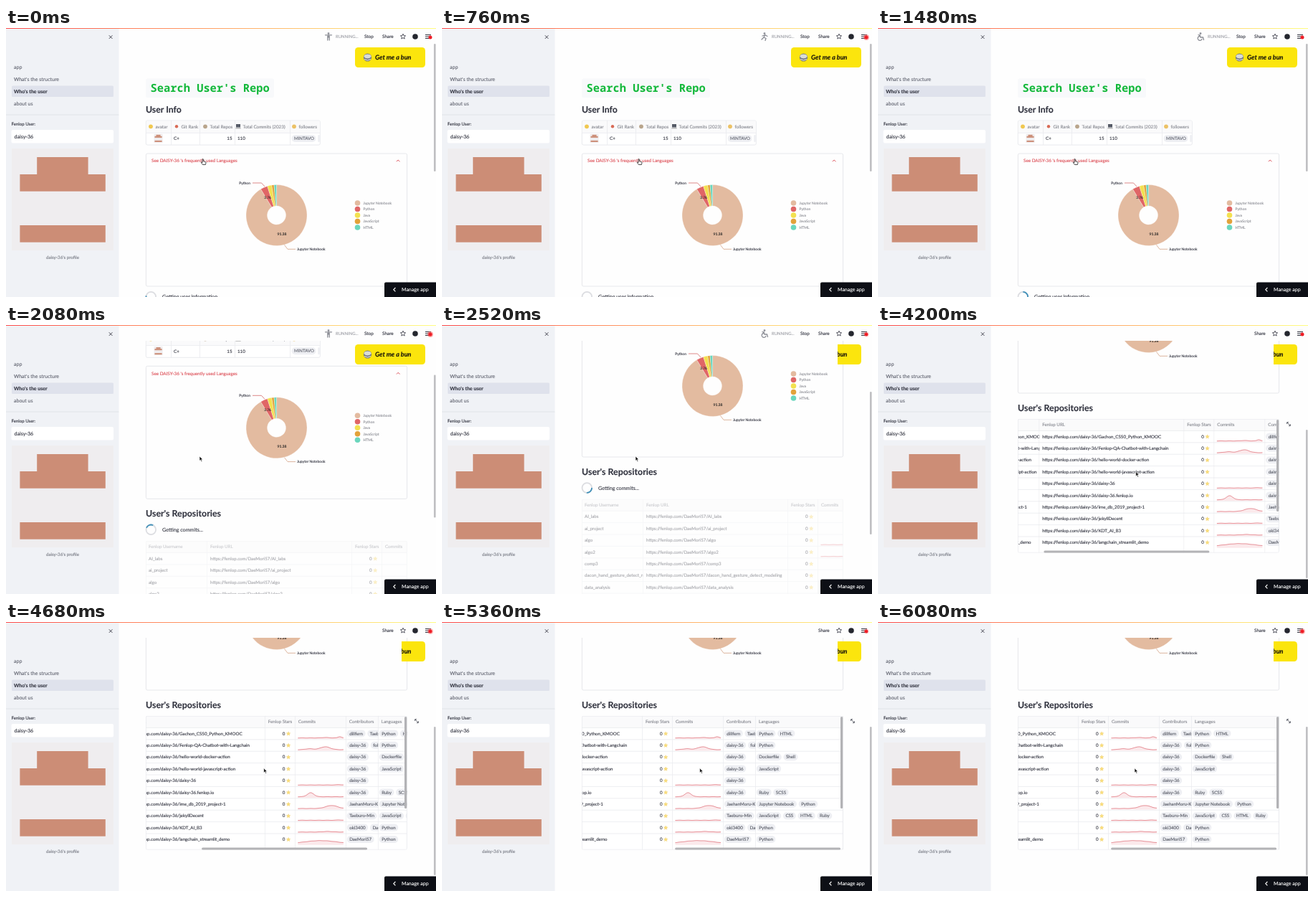
An HTML page that plays this animation: 600x375 px, repeating every 6.12 s.

```html
<!DOCTYPE html>
<html lang="en">
<head>
<meta charset="utf-8">
<title>Repository dashboard</title>
<style>
  html, body { margin: 0; width: 100%; height: 100%; overflow: hidden; background: #fefefe; }
  svg { display: block; }
  #stage { width: 100vw; height: 100vh; }
  text { font-family: Lato, "Open Sans", sans-serif; white-space: pre; text-rendering: geometricPrecision; }
</style>
</head>
<body>
<svg id="stage" viewBox="0 0 600 375" xmlns="http://www.w3.org/2000/svg"></svg>
<script>
const LOOP = 6120;
const USER = "daisy-36", OLD_USER = "DaeMori57", HOST = "Fenlop";
const INK = "#31333f", GREY = "#85878f", LINE = "#e9eaee", RED = "#dc4c55", CLAY = "#cc8d76", PAPER = "#fefefe";
const ROW = 16.4;
const stage = document.getElementById("stage");

// Markup helpers; text is placed by its visual middle and slightly thickened.
const text = (x, y, str, size = 6.2, fill = INK, extra = "") =>
  `<text x="${x}" y="${y + size * 0.36}" font-size="${size}" fill="${fill}" stroke="${fill}" stroke-width="0.12" ${extra}>${str}</text>`;
const rect = (x, y, w, h, fill, extra = "") =>
  `<rect x="${x}" y="${y}" width="${w}" height="${h}" fill="${fill}" ${extra}/>`;
const path = (d, stroke = INK, width = 1, fill = "none", extra = "") =>
  `<path d="${d}" stroke="${stroke}" stroke-width="${width}" fill="${fill}" ${extra}/>`;
const dot = (x, y, r, fill, extra = "") => `<circle cx="${x}" cy="${y}" r="${r}" fill="${fill}" ${extra}/>`;
const group = (id, body, extra = "") => `<g id="${id}" ${extra}>${body}</g>`;
const pane = (x, y, w, h, body) =>
  `<svg x="${x}" y="${y}" width="${w}" height="${h}" overflow="hidden">${body}</svg>`;
const BOLD = 'font-weight="700"', END = 'text-anchor="end"', MID = 'text-anchor="middle"';

function starPath(cx, cy, r) {
  const points = Array.from({ length: 10 }, (_, i) => {
    const a = i * Math.PI / 5, k = i % 2 ? r * 0.45 : r;
    return `${(cx + k * Math.sin(a)).toFixed(2)} ${(cy - k * Math.cos(a)).toFixed(2)}`;
  });
  return `M${points.join("L")}Z`;
}

function avatar(x, y, k) {
  return `<g transform="translate(${x} ${y}) scale(${k})">` + rect(0, 0, 142, 142, "#efedef") +
    rect(35.2, 12, 71.4, 24.5, CLAY) + rect(11.4, 36, 119.4, 23.7, CLAY) + rect(11.4, 107, 119.4, 23.7, CLAY) + "</g>";
}

function sidebar() {
  const nav = "#60636f";
  return rect(0, 0, 157.5, 375, "#f0f2f6") +
    path("M143.8 10.3l4.6 4.6M148.4 10.3l-4.6 4.6", INK, 0.9) +
    rect(8, 80.5, 142, 15.5, "#dfe2ec", 'rx="1.5"') +
    text(11, 54.5, "app", 7, nav) + text(11, 71.5, "What's the structure", 7, nav) +
    text(11, 88.3, "Who's the user", 7, INK, BOLD) + text(11, 105, "about us", 7, nav) +
    path("M0 121H157.5", "#dcdee4", 0.8) +
    text(7.5, 134, `${HOST} User:`, 6.1) +
    rect(7.5, 142, 142.5, 18.5, "#fff", 'rx="2"') + text(11.5, 151, USER, 7.1) +
    avatar(8, 168, 1) + text(79, 320, `${USER}'s profile`, 6.2, "#777a84", MID);
}

function infoTable() {
  const heads = [[202, "avatar", "#f0c850"], [238, "Git Rank", "#d86a55"], [278, "Total Repos", "#b9a58c"],
    [324, "Total Commits (2023)", "#555a66"], [402, "followers", "#ecc266"]];
  return rect(195.3, 129, 243, 34, "#fff", `stroke="${LINE}" rx="2"`) + rect(195.8, 129.5, 242, 16.5, "#fafafb") +
    path("M195 146.3H438M230.5 129V163M270.5 129V163M319.5 129V163M396.5 129V163", LINE, 0.8) +
    heads.map(([x, label, tint], i) => (i === 3
      ? rect(x - 3, 134, 6, 4.5, tint) + path("M320.4 139.8h7.2", "#999", 1)
      : dot(x, 137.3, i === 1 ? 2.2 : 2.9, tint)) + text(x + 6.5, 137.3, label, 6.3, GREY)).join("") +
    avatar(206.5, 147.8, 0.085) + text(234, 154, "C+") + text(315.5, 154, "15", 6.2, INK, END) + text(323, 154, "110") +
    rect(398.5, 149, 34, 10, "#eeeff3", 'rx="5"') + text(402, 154, "MINTAVO", 6.1, "#656873") +
    rect(435.2, 149, 2.6, 10, "#eeeff3", 'rx="1.3"');
}

function pie() {
  const cx = 377.5, cy = 261, R = 42.5, r = 13;
  const slices = [["Jupyter Notebook", 91.38, "#e3bba0"], ["Python", 3.76, "#e06666"], ["Java", 2.3, "#f3e150"],
    ["JavaScript", 1.28, "#e3a23a"], ["HTML", 1.28, "#6bd6bd"]];
  const at = (share, k) => {
    const a = share / 100 * 2 * Math.PI;
    return `${(cx + k * Math.sin(a)).toFixed(2)} ${(cy - k * Math.cos(a)).toFixed(2)}`;
  };
  let from = 0, out = "";
  slices.forEach(([name, share, fill], i) => {
    const to = from + share, big = share > 50 ? 1 : 0;
    out += path(`M${at(from, R)}A${R} ${R} 0 ${big} 1 ${at(to, R)}L${at(to, r)}A${r} ${r} 0 ${big} 0 ${at(from, r)}Z`,
      "#fff", 0.3, fill);
    out += dot(490.5, 244 + i * 8.5, 3.8, fill) + text(498.5, 244 + i * 8.5, name, 5, "#8d8f96");
    from = to;
  });
  return out + path("M361 221L356.5 216H344", "#d56a6a", 0.8) + path("M388.5 302.5L393 308.3H404", "#d3a386", 0.8) +
    text(341, 216, "Python", 5, INK, END) + text(406, 308.3, "Jupyter Notebook", 5) +
    text(385, 287, "91.38", 5, "#222", MID) + text(365, 236, "3.76", 4.8, "#222", MID);
}

function spinner(id, y, label) {
  return dot(202.3, y, 6.8, "none", 'stroke="#dcdde1" stroke-width="1.8"') +
    `<circle id="${id}" cx="202.3" cy="${y}" r="6.8" fill="none" stroke="#3f8fb8" stroke-width="1.8" stroke-dasharray="11 32"/>` +
    text(218, y, label, 7.2);
}

// Each bump is [centre, spread, height] along a unit-wide line.
function sparkline(x, base, bumps) {
  const points = Array.from({ length: 33 }, (_, i) => {
    const u = i / 32;
    const h = bumps.reduce((s, [c, w, k]) => s + k * Math.exp(-(((u - c) / w) ** 2)), 0.25 * Math.sin(u * 17) ** 2);
    return `${(x + u * 63.5).toFixed(1)} ${(base - h).toFixed(2)}`;
  }).join("L");
  return path(`M${points}L${x + 63.5} ${base + 1.5}H${x}Z`, "none", 0, "#fbe9eb") + path(`M${points}`, "#e0737c", 0.8);
}

const ruler = document.createElement("canvas").getContext("2d");
function pills(x, y, labels) {
  ruler.font = "62px Lato, 'Open Sans', sans-serif";
  return labels.map(label => {
    const w = ruler.measureText(label).width / 10 + 7;
    const out = rect(x, y - 5, w, 10, "#eeeff3", 'rx="5"') + text(x + 3.5, y, label, 6.2, "#555863");
    x += w + 2.7;
    return out;
  }).join("");
}

const flat = [[0.9, 0.06, 0.5]];
const repos = [
  ["Gachon_CS50_Python_KMOOC", [[0.92, 0.05, 1.8], [0.6, 0.1, 0.6]], ["dillfern", "Taeburo-Min"], ["Python", "HTML"]],
  [`${HOST}-QA-Chatbot-with-Langchain`, [[0.6, 0.15, 4], [0.25, 0.12, 1.3]], [USER, "follen"], ["Python"]],
  ["hello-world-docker-action", null, [USER], ["Dockerfile", "Shell"]],
  ["hello-world-javascript-action", null, [USER], ["JavaScript"]],
  [USER, flat, [USER], []],
  [`${USER}.${HOST.toLowerCase()}.io`, [[0.28, 0.1, 5.6]], [USER], ["Ruby", "SCSS"]],
  ["ime_db_2019_project-1", [[0.74, 0.18, 4.2]], ["JaehanMoru-K"], ["Jupyter Notebook", "Python"]],
  ["jekyllDecent", flat, ["Taeburo-Min"], ["JavaScript", "CSS", "HTML", "Ruby"]],
  ["KDT_AI_B3", [[0.65, 0.15, 0.8]], ["oki3400", OLD_USER], ["Python"]],
  ["langchain_streamlit_demo", [[0.5, 0.5, 4.4]], [OLD_USER], ["Python"]],
];
const oldRepos = ["AI_labs", "ai_project", "algo", "algo2", "comp3", "dacon_hand_gesture_detect_modeling",
  "data_analysis", "deep_learning", "web_study", "wiki_notes"]
  .map((name, i) => [name, i === 2 || i === 3 ? flat : null, [OLD_USER], ["Python"]]);

function grid(id, top, user, rows) {
  const height = ROW * (rows.length + 1) + 6.5;
  const mid = i => 24.6 + i * ROW;
  const columns = [
    [0, 86, `${HOST} Username`, ([name], y) => text(4, y, name)],
    [86, 202, `${HOST} URL`, ([name], y) => text(4, y, `https://${HOST.toLowerCase()}.com/${user}/${name}`)],
    [288, 42, `${HOST} Stars`, (_, y) => text(27.5, y, "0", 6.2, INK, END) + path(starPath(32.2, y + 0.3, 2.9), "#e9bd45", 0.3, "#fadf7c")],
    [330, 71, "Commits", ([, bumps], y) => bumps ? sparkline(3.5, y + 6.3, bumps) : ""],
    [401, 45, "Contributors", ([, , people], y) => pills(0.8, y, people)],
    [446, 122, "Languages", ([, , , langs], y) => pills(0.8, y, langs)],
  ];
  const body = columns.map(([x, w, head, cell]) => pane(x, 0, w, height,
    text(4, 8.3, head, 6.2, GREY) + rows.map((row, i) => cell(row, mid(i))).join("") +
    path(`M${w - 0.4} 0V${height}`, LINE, 0.8))).join("");
  const lines = rows.map((_, i) => `M0 ${(16.6 + i * ROW).toFixed(1)}H364`).join("");
  return pane(195, top, 365, height,
    rect(0, 0, 365, height, "#fff") + rect(0, 0, 365, 16.6, "#fafafb") + path(lines, LINE, 0.8) +
    group(id, body) +
    rect(0.4, 0.4, 364, height - 0.8, "none", `stroke="${LINE}" stroke-width="0.8" rx="2"`));
}

function teaButton() {
  return rect(487, 27, 98, 28, "#fbe50d", 'rx="4.5"') +
    dot(504.5, 41, 5.6, "#6f7480") + `<ellipse cx="504.5" cy="39.4" rx="5" ry="3" fill="#d9dcd6"/>` +
    path("M500 43.5q4.5 3 9 0", "#fff", 0.9) +
    text(515, 41, "Get me a bun", 9, "#14110a", 'font-weight="700" font-style="italic"');
}

// Small activity figures shown beside the running label.
const poses = [
  "M445.5 9.8H454.5M450 9.5V13M448.8 17V11.5M451.2 17V11.5",
  "M449 9.5L450 13H453.5L454.5 16.5M448.5 11.5A3 3 0 1 0 452 15.5M447 9.5L449 10.5",
  "M451 9.5L449 13L452 14.5L451 17.5M449 13L446 16M447 11L451 9.8L454 11.5",
  "M446 14L450 11L453 13.5M445.5 16.5q2.2-1.6 4.5 0t4.5 0",
];

function header() {
  return rect(157.5, 0, 442.5, 22, PAPER) +
    group("running", dot(450, 7.6, 1.4, "#8b8d95") + path(poses[0], "#8b8d95", 1.3, "none", 'id="figure" stroke-linecap="round"') +
      text(460, 12, "RUNNING...", 5.9, "#a0a2a9") + text(500, 12, "Stop", 6.4)) +
    text(525, 12, "Share", 6.4) + path(starPath(554, 12, 3.8), INK, 0.8) + dot(571, 12, 3.8, "#24262e") +
    path("M585 9.5H593M585 12H593M585 14.5H593", INK, 1) +
    dot(592, 13, 4, "#ff5050", 'id="glow"') + dot(592, 13, 2.5, "#ee1c25");
}

stage.innerHTML = `<defs><linearGradient id="deco"><stop stop-color="#ff4b4b"/><stop offset="1" stop-color="#fffd80"/></linearGradient></defs>` +
  rect(0, 0, 600, 375, PAPER) +
  group("intro", rect(195, 70.5, 179, 26.5, "#f8f9fb", 'rx="2"') +
    `<text x="201.5" y="89.3" font-size="15.4" font-weight="700" fill="#12b83a" style="font-family:'Noto Sans Mono','DejaVu Sans Mono',monospace">Search User's Repo</text>` +
    text(195, 113.8, "User Info", 12.3, INK, BOLD) + infoTable() +
    rect(195.4, 175, 364.2, 185, "none", `stroke="#e4e5e9" stroke-width="0.9" rx="2"`)) +
  teaButton() +
  group("page",
    text(203, 185, `See ${USER.toUpperCase()} 's frequently used Languages`, 6.3, RED) +
    path("M545 186.2L547.2 184L549.4 186.2", RED, 1) +
    rect(203, 197, 349, 153, PAPER) + pie() +
    group("loadingUser", spinner("spinA", 374.6, "Getting user information...")) +
    group("repoHead", text(195, 380.3, "User's Repositories", 12.4, INK, BOLD)) +
    group("loadingCommits", spinner("spinB", 403, "Getting commits...") +
      group("stale", grid("oldCells", 418.6, OLD_USER, oldRepos), 'opacity="0.42"')) +
    group("fresh", grid("cells", 395.8, USER, repos) +
      rect(556, 397, 3.2, 128, "#b3b3b6", 'rx="1.6"') + rect(196, 579.6, 231, 3, "#b3b3b6", 'rx="1.5" id="hThumb"'))) +
  group("expand", path("M571 136L575 140M570.6 138V135.6H573M575.4 138.2V140.6H573", "#555863", 0.9)) +
  header() + sidebar() +
  rect(597, 22, 2.6, 178, "#bfbfc2", 'rx="1.3" id="vThumb"') +
  rect(0, 0, 600, 1, "url(#deco)") +
  path("M528 375V356.5q0-2 2-2H600V375Z", "none", 0, "#0d0f16") +
  path("M543.4 362L540.8 364.7L543.4 367.4", "#fff", 1.1) + text(552, 364.8, "Manage app", 7, "#fff") +
  group("arrow", path("M0 0V6.3L1.5 5L2.6 7.4L3.7 6.9L2.6 4.6H4.6Z", "#fff", 0.6, "#111")) +
  group("hand", path("M-1 -3.5q.9-1 1.6 0V-.6L3.2 0q1 .3.8 1.4L3.4 4H-.6L-2.8 .9q.3-1 1.8.3Z", "#222", 0.8, "#fff"),
    'transform="translate(275 186.5)"');

const node = Object.fromEntries([...stage.querySelectorAll("[id]")].map(n => [n.id, n]));
const show = (n, on) => n.setAttribute("display", on ? "inline" : "none");
const move = (n, x, y) => n.setAttribute("transform", `translate(${x.toFixed(2)} ${y.toFixed(2)})`);
const smooth = u => u * u * (3 - 2 * u);

// Keys are [time, value]; values hold outside the range.
function track(keys, t, ease = u => u) {
  if (t <= keys[0][0]) return keys[0][1];
  for (let i = 1; i < keys.length; i++) {
    const [a, from] = keys[i - 1], [b, to] = keys[i];
    if (t < b) return from + (to - from) * ease((t - a) / (b - a));
  }
  return keys[keys.length - 1][1];
}

const scrollKeys = [[1700, 0], [2320, 176], [2720, 176], [3040, 265]];
const sideKeys = [[3640, 0], [4200, 55.5], [4680, 121], [5240, 203]];
const cursorX = [[2800, 270], [3280, 355], [3700, 355], [4160, 359.7], [5300, 359.7], [5900, 358]];
const cursorY = [[2800, 183], [3280, 205], [4200, 204.5], [4680, 203.8]];

function draw(t) {
  const y = track(scrollKeys, t, smooth), x = track(sideKeys, t);
  const userReady = t >= 1600, done = t >= 2800;
  move(node.intro, 0, -y);
  move(node.page, 0, -y);
  move(node.cells, -x, 0);
  node.hThumb.setAttribute("x", 196 + x * 0.636);
  node.vThumb.setAttribute("y", 22 + y * (done ? 0.468 : 0.403));
  node.vThumb.setAttribute("height", done ? 207 : userReady ? 199 : 178);

  show(node.loadingUser, !userReady);
  show(node.repoHead, userReady);
  show(node.loadingCommits, userReady && !done);
  show(node.fresh, done);
  show(node.running, !done);
  show(node.expand, t >= 3160);

  // A dash starts at three o'clock, so its middle sits 45 degrees further on.
  node.spinA.setAttribute("transform", `rotate(${t * 0.36 + 97} 202.3 374.6)`);
  node.spinB.setAttribute("transform", `rotate(${t * 0.36 - 187} 202.3 403)`);
  node.figure.setAttribute("d", poses[Math.floor(t / 260) % poses.length]);
  node.glow.setAttribute("opacity", (0.25 - 0.25 * Math.cos(t / 1400 * 2 * Math.PI)).toFixed(3));

  const hovering = y < 8;
  show(node.hand, hovering);
  show(node.arrow, !hovering);
  move(node.arrow, track(cursorX, t, smooth), track(cursorY, t, smooth));
}

const start = performance.now();
function tick() {
  draw((performance.now() - start) % LOOP);
  requestAnimationFrame(tick);
}
tick();
</script>
</body>
</html>
```
